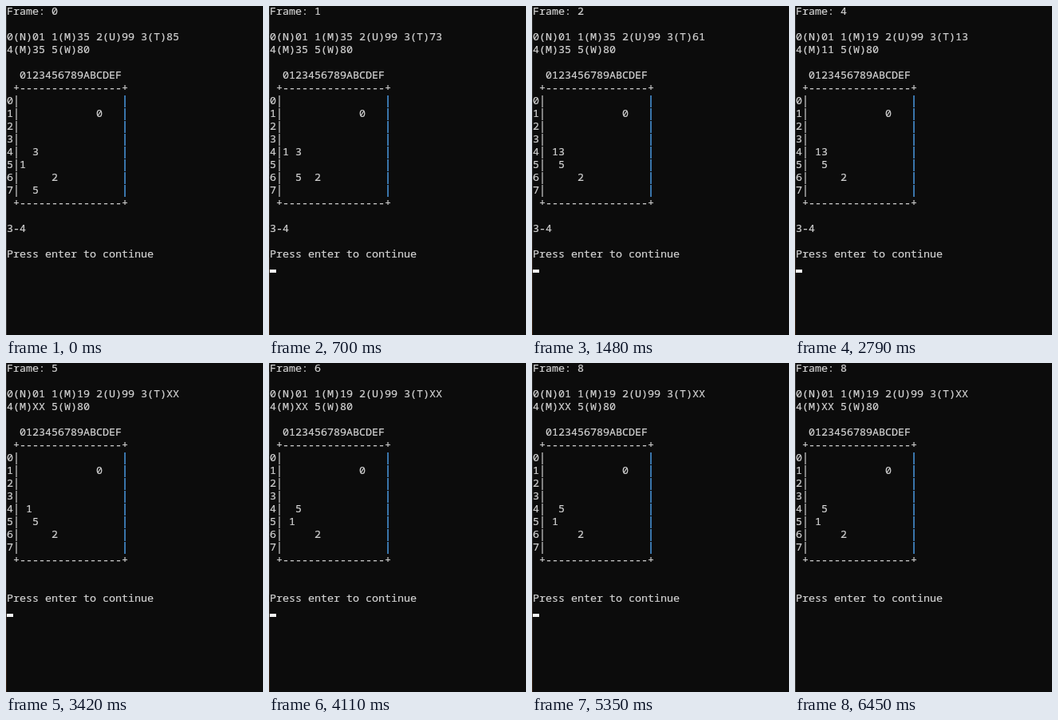
Write an HTML page that moves like this. It is 322x412 px and loops after 6.53 s.

```html
<!DOCTYPE html>
<html lang="en">
<head>
<meta charset="utf-8">
<title>Grid battle</title>
<style>
  html, body { margin: 0; width: 100%; height: 100%; overflow: hidden; background: #0c0c0c; }
  svg { display: block; }
  text {
    font: 13.333px "Noto Sans Mono", "DejaVu Sans Mono", monospace;
    white-space: pre;
    fill: #d2d2d2;
    stroke: #d2d2d2;
    stroke-width: .2px;
  }
  .wall { stroke-width: 1.5; stroke-dasharray: 15 1; }
</style>
</head>
<body>
<svg width="322" height="412" viewBox="0 0 322 412">
  <defs>
    <linearGradient id="warm" x1="0" y1="0" x2="0" y2="1">
      <stop offset="0" stop-color="#333"/>
      <stop offset=".6" stop-color="#2c2c2c"/>
      <stop offset="1" stop-color="#3a2618"/>
    </linearGradient>
  </defs>
  <rect width="322" height="412" fill="#0c0c0c"/>
  <rect id="edge" width="1" height="412"/>
  <g id="screen">
    <g id="lines"></g>
    <path class="wall" d="M13 112V240" stroke="#a6a6a6"/>
    <path class="wall" d="M149 112V240" stroke="#4a98e0"/>
  </g>
  <rect id="cursor" x="1" width="8" height="4" fill="#f2f2f2"/>
</svg>
<script>
const LOOP = 6530, ROW = 16, ECHO = 80;
const [screen, lineBox, cursor, edge] =
  ['screen', 'lines', 'cursor', 'edge'].map(id => document.getElementById(id));

// Moments at which Enter brings up the next turn
const presses = [700, 1480, 2090, 2790, 3420, 4110, 4720, 5350];

function health(n) {
  const melee = Math.min(Math.max(n - 2, 0), 2);
  const alive = n < 5;
  return {
    alive,
    hp1: 35 - 8 * melee,
    hp3: alive ? 85 - 12 * (n + melee) : 'XX',
    hp4: alive ? 35 - 12 * melee : 'XX'
  };
}

// Units close in on 3, then 1 and 5 keep trading rows: [id, row, column]
function units(n, alive) {
  const swapped = !alive && n % 2 === 0;
  return [
    [0, 1, 12],
    [2, 6, 5],
    [1, n === 0 || swapped ? 5 : 4, n < 2 ? 0 : 1],
    [5, swapped ? 4 : Math.max(7 - n, 5), 2],
    ...(alive ? [[3, 4, 2]] : [])
  ];
}

function lines(n) {
  const { alive, hp1, hp3, hp4 } = health(n);
  const grid = Array.from({ length: 8 }, () => Array(16).fill(' '));
  for (const [id, r, c] of units(n, alive)) grid[r][c] = id;
  const rule = ' +' + '-'.repeat(16) + '+';
  return [
    'Frame: ' + n, '',
    `0(N)01 1(M)${hp1} 2(U)99 3(T)${hp3}`,
    `4(M)${hp4} 5(W)80`, '',
    '  0123456789ABCDEF',
    rule, ...grid.map((row, i) => `${i} ${row.join('')}`), rule, '',
    ...(alive ? ['3-4'] : []), '',
    'Press enter to continue'
  ];
}

const show = (el, on) => el.setAttribute('visibility', on ? 'visible' : 'hidden');
let shown;

function draw(t) {
  const turn = presses.filter(p => p <= t).length;
  // Every fourth turn is slow enough to show the echoed newline
  const echo = turn % 4 === 1 && presses[turn] - t <= ECHO;
  const text = lines(turn);
  if (turn !== shown) {
    shown = turn;
    lineBox.innerHTML = text.map((line, i) =>
      `<text x="1" y="${i * ROW + 11}">${line}</text>`).join('');
  }
  show(screen, !(echo && turn === 1));
  show(cursor, turn > 0 && t < 6130);
  cursor.setAttribute('y', (text.length + echo) * ROW + 10);
  edge.setAttribute('fill', t < 300 || t >= 6450 ? '#3c3c3c' : 'url(#warm)');
}

const begin = performance.now();
function tick() {
  draw((performance.now() - begin) % LOOP);
  requestAnimationFrame(tick);
}
tick();
</script>
</body>
</html>
```
